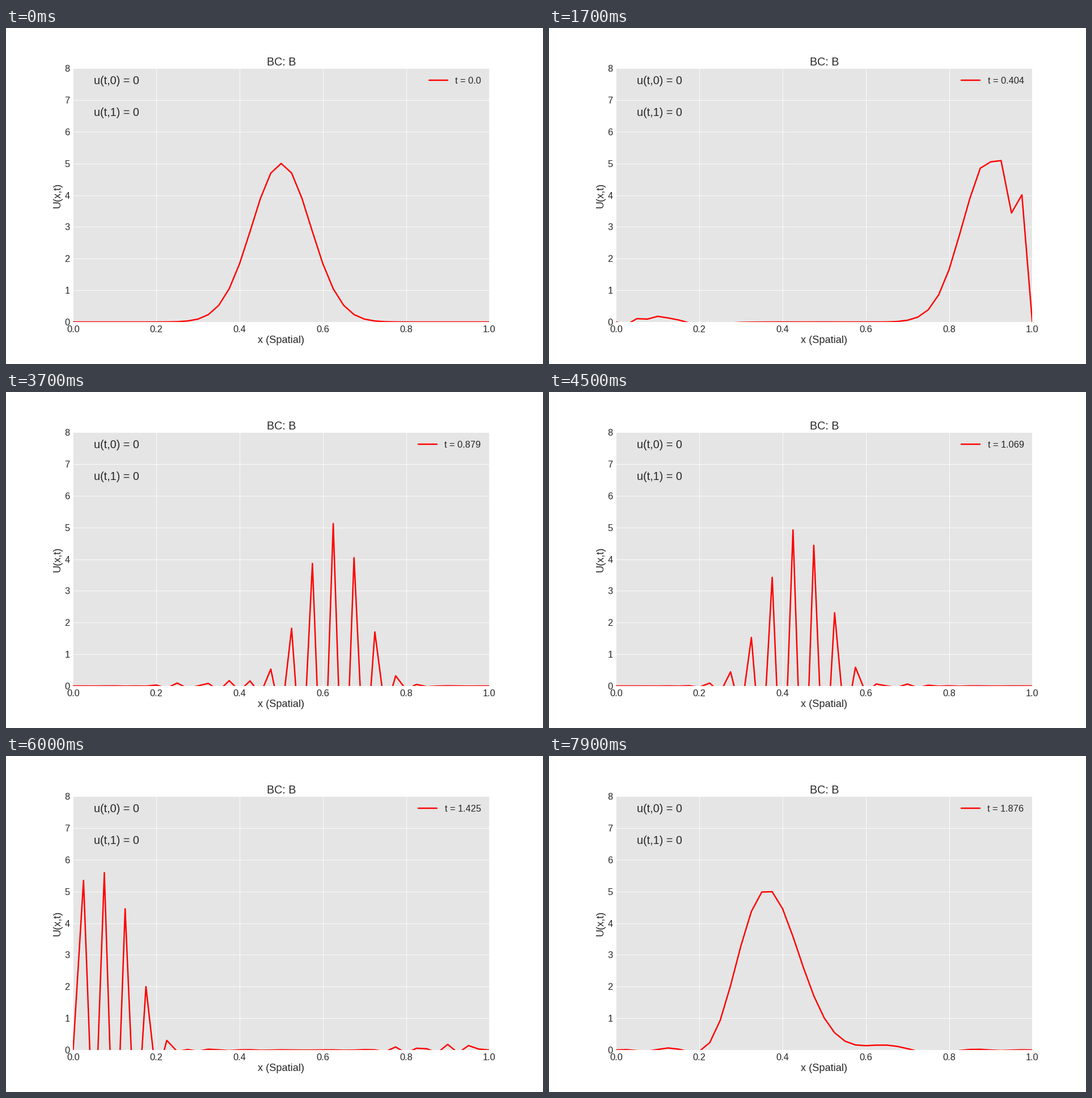
Write a matplotlib script that moves like this. It is 947 px wide and 592 px high and loops after 8000 ms.

```python
import numpy as np
import matplotlib.pyplot as plt
from matplotlib.animation import FuncAnimation

W, H = 947, 592
DPI = W / 16
FRAMES, INTERVAL = 80, 100
INK = "#262626"

plt.rcParams.update({
    "font.family": "Liberation Sans",
    "text.color": INK,
    "axes.labelcolor": INK,
    "xtick.color": INK,
    "ytick.color": INK,
})

# Advection u_t + u_x = 0, leapfrog in time, fixed zero ends
DX = 0.025
CFL = 0.95
DT = CFL * DX
x = np.linspace(0, 1, 41)


def centred(u):
    return CFL * (u[2:] - u[:-2])


def solve(steps):
    u = np.zeros((steps, x.size))
    u[0] = 5 * np.exp(-100 * (x - 0.5) ** 2)
    u[1, 1:-1] = u[0, 1:-1] - centred(u[0]) / 2
    for n in range(1, steps - 1):
        u[n + 1, 1:-1] = u[n - 1, 1:-1] - centred(u[n])
    return u


def label(n):
    return f"t = {round(n * DT, 3)}"


u = solve(FRAMES)

fig = plt.figure(figsize=(16, (H + 1e-6) / DPI), dpi=DPI, facecolor="white")
ax = fig.add_axes([0.125, 0.125, 0.775, 0.755], facecolor="#E5E5E5")
ax.set(xlim=(0, 1), ylim=(0, 8), yticks=range(9))
ax.set_xticks(np.linspace(0, 1, 6))
ax.set_axisbelow(True)
ax.grid(color="white", linewidth=1)
ax.tick_params(length=0, pad=7, labelsize=20)
for spine in ax.spines.values():
    spine.set_visible(False)

ax.set_title("BC: B", fontsize=24, pad=6)
ax.set_xlabel("x (Spatial)", fontsize=22, labelpad=4)
ax.set_ylabel("U(x,t)", fontsize=22, labelpad=4)
ax.text(0.05, 7.5, "u(t,0) = 0", fontsize=24)
ax.text(0.05, 6.5, "u(t,1) = 0", fontsize=24)

line, = ax.plot(x, u[0], color="red", linewidth=3,
                solid_capstyle="round", label=label(0))
legend = ax.legend(loc="upper right", fontsize=20, frameon=False)
time_text = legend.get_texts()[0]


def update(n):
    line.set_ydata(u[n])
    time_text.set_text(label(n))
    return line, time_text


anim = FuncAnimation(fig, update, frames=FRAMES, interval=INTERVAL,
                     repeat=True, repeat_delay=0, blit=False)
plt.show()
```
